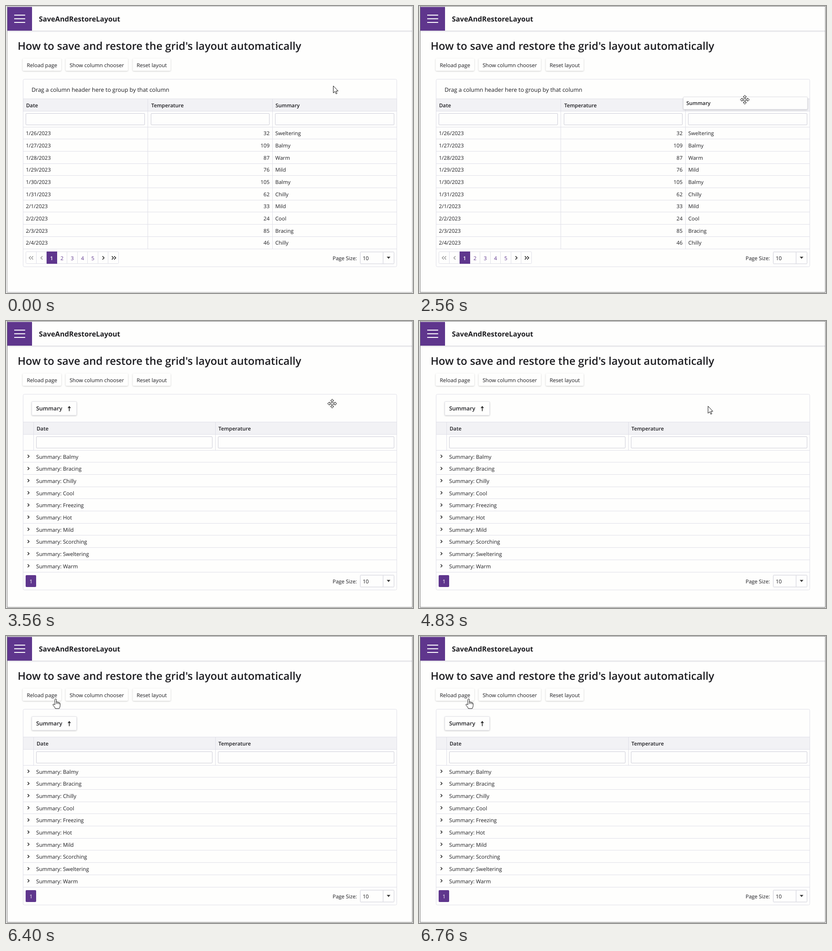
Recreate the animation shown at these times as an HTML page. Size 891 by 629 pixels, loop 9500 ms.

```html
<!DOCTYPE html>
<html lang="en">
<head>
<meta charset="utf-8">
<title>SaveAndRestoreLayout</title>
<style>
  html, body { margin: 0; width: 100%; height: 100%; overflow: hidden; background: #f0f0f0; }
  svg { display: block; }
  text { font-family: "Open Sans", "Noto Sans", sans-serif; white-space: pre; text-rendering: geometricPrecision; }
  .raised { fill: #fefefd; filter: drop-shadow(0 1px 1.5px #0003); }
  .box { fill: #fefefd; stroke: #cdcdd8; }
  .line { fill: none; stroke: #dfdfe8; }
  .ink { fill: none; stroke: #222; stroke-width: 1.6; }
  .cursor { fill: #fff; stroke: #111; stroke-linejoin: round; }
</style>
</head>
<body>
<svg id="stage" width="891" height="629" viewBox="0 0 891 629"></svg>
<script>
const PURPLE = '#5f368d';
const LOOP = 9500;

const text = (x, mid, str, { size = 11.5, weight = 400, fill = '#1c1c20', anchor = 'start' } = {}) =>
  `<text x="${x}" y="${mid + size * 0.365}" font-size="${size}" font-weight="${weight}" fill="${fill}" text-anchor="${anchor}">${str}</text>`;
const rect = (x, y, right, bottom, attrs) =>
  `<rect x="${x}" y="${y}" width="${right - x}" height="${bottom - y}" ${attrs}/>`;
const path = (d, attrs) => `<path d="${d}" ${attrs}/>`;
const box = (x, y, right, bottom) => rect(x, y, right, bottom, 'rx="1.5" class="box"');
const group = (id, body) => `<g id="${id}">${body}</g>`;
const rows = (items, draw) => items.map(draw).join('');
const rowLine = (top, i) => Math.floor(top + 0.3 + 26.67 * i) + 0.5;
const arrow = (x, y, dir) =>
  path(`M${x} ${y}v${dir * 10}m-2.7 ${dir * -3.2}l2.7 ${dir * 3.2} 2.7 ${dir * -3.2}`, 'class="ink"');
const chevron = (x, y, dir, color, h = 3.6) =>
  path(`M${x - dir * h / 2} ${y - h}l${dir * h} ${h} ${-dir * h} ${h}`, `class="ink" style="stroke:${color};stroke-width:1.5"`);

function frame() {
  const bars = rows([20, 28, 36], y => path(`M18 ${y}H42`, 'stroke="#fff" stroke-width="2"'));
  return rect(3, 1, 889, 627, 'fill="#fefefd"') +
    rect(3, 54, 889, 55, 'fill="#dcdce0"') + rect(3, 55, 889, 56, 'fill="#e9e9ec"') +
    rect(3, 56, 889, 57.5, 'fill="#f6f6f7"') +
    rect(3, 2, 57, 54, `fill="${PURPLE}"`) + bars +
    rect(2.5, 0.5, 889.5, 627.5, 'id="border" fill="none"') +
    text(72, 28.7, 'SaveAndRestoreLayout', { size: 15.4, weight: 700 }) +
    text(25.5, 87, "How to save and restore the grid's layout automatically", { size: 23.4, weight: 600 });
}

function buttons() {
  return rows([[36.5, 121, 'Reload page'], [130.5, 267, 'Show column chooser'], [277.5, 360.5, 'Reset layout']],
    ([x, right, label]) => rect(x, 115, right, 142, 'rx="2" class="raised"') +
      text((x + right) / 2, 129.5, label, { anchor: 'middle', size: 11.6 }));
}

// Shared grid parts: outline, header, filter row, row lines, page size
function gridShell(head, columns, dividers, dividerEnd) {
  const top = head + 61, end = rowLine(top, 10);
  const lines = Array.from({ length: 11 }, (_, i) => `M37 ${rowLine(top, i)}H856`).join('');
  return rect(37, head, 856, head + 26.5, 'fill="#f2f2f5"') +
    path(`M37 ${head - 0.5}H856M37 ${head + 26.5}H856${lines}` +
      dividers.map(x => `M${x} ${head}V${dividerEnd}`).join(''), 'class="line"') +
    rect(37.5, 160.5, 855.5, end + 39, 'rx="3" class="line"') +
    rows(columns, ([label, x, right]) =>
      text(x + 0.5, head + 13.7, label, { weight: 600, size: 11.4 }) +
      box(x, head + 31.5, right, head + 56.5)) +
    text(715, end + 20.3, 'Page Size:') +
    box(775.5, end + 6.5, 849.5, end + 32.5) +
    path(`M825.5 ${end + 7}v25`, 'stroke="#cdcdd8"') +
    text(781, end + 20.3, '10') +
    path(`M833.5 ${end + 17}h8l-4 4.6z`, 'fill="#333"');
}

function flatGrid() {
  const data = [32, 'Sweltering', 109, 'Balmy', 87, 'Warm', 76, 'Mild', 105, 'Balmy',
    62, 'Chilly', 33, 'Mild', 24, 'Cool', 85, 'Bracing', 46, 'Chilly'];
  const body = rows([...Array(10).keys()], i => {
    const y = 279.2 + 26.67 * i;
    const day = new Date(2023, 0, 26 + i);
    return text(43.5, y, `${day.getMonth() + 1}/${day.getDate()}/2023`) +
      text(577, y, data[2 * i], { anchor: 'end' }) + text(589.5, y, data[2 * i + 1]);
  });
  const cell = 22.56;
  const pages = rows([1, 2, 3, 4, 5], n =>
    text(43.5 + cell * (n + 1.5), 552.5, n, { anchor: 'middle', fill: n === 1 ? '#fff' : PURPLE, weight: n === 1 ? 600 : 400 }));
  const seams = [1, 2, 3, 4, 5, 6, 7, 8].map(i => `M${Math.floor(43.5 + cell * i) + 0.5} 539v26`).join('');
  return gridShell(204, [['Date', 43.5, 303.5], ['Temperature', 317.5, 576.5], ['Summary', 589.5, 849.5]], [310.5, 583.5], 532) +
    text(56, 183, 'Drag a column header here to group by that column', { size: 12.45 }) + body +
    rect(43.5, 538.5, 246.5, 564.5, 'rx="2" class="line"') + path(seams, 'class="line"') +
    rect(89, 538, 112, 565, `fill="${PURPLE}"`) + pages +
    chevron(52.5, 552, -1, '#999') + chevron(57.5, 552, -1, '#999') + chevron(78, 552, -1, '#999') +
    chevron(213, 552, 1, '#222') + chevron(233.5, 552, 1, '#222') + chevron(238.5, 552, 1, '#222');
}

function groupedGrid() {
  const names = ['Balmy', 'Bracing', 'Chilly', 'Cool', 'Freezing', 'Hot', 'Mild', 'Scorching', 'Sweltering', 'Warm'];
  return gridShell(222, [['Date', 66.5, 451.5], ['Temperature', 464.5, 849.5]], [60.5, 458.5], 283) +
    rect(56.5, 176.5, 154.5, 206.5, 'rx="2" class="raised" stroke="#e2e2e8"') +
    text(66, 192, 'Summary', { size: 12.3, weight: 600 }) + arrow(138.5, 197.5, -1) +
    rows(names, (name, i) => {
      const y = 297.3 + 26.67 * i;
      return chevron(49, y - 0.8, 1, '#222', 3.2) + text(66, y, 'Summary: ' + name, { size: 11.7 });
    }) +
    rect(43, 557, 66, 583, `rx="2" fill="${PURPLE}"`) +
    text(54.8, 570.5, '1', { fill: '#fff', anchor: 'middle' });
}

const shapes = {
  pointer: 'M0 0V15.5L3.6 12.2 6 17.6 8.3 16.6 6 11.3H10.6Z',
  move: 'M0-10L3.5-6H1.3V-1.3H6V-3.5L10 0 6 3.5V1.3H1.3V6H3.5L0 10-3.5 6H-1.3V1.3H-6V3.5L-10 0-6-3.5V-1.3H-1.3V-6H-3.5Z',
  hand: 'M-2 13V1.5A1.7 1.7 0 0 1 1.4 1.5V7Q3 5.6 4.4 7.4Q6 6.4 7.2 8.2Q9.3 7.8 9.5 9.8V14.5Q9.5 17.5 7.5 21H-1Q-2 18-6 13.6Q-6.8 11.4-5 11.2Q-3.6 11.2-2 13ZM1.4 7V11M4.4 7.4V11M7.2 8.2V11.5'
};

const stage = document.getElementById('stage');
stage.innerHTML = frame() + group('buttons', buttons()) + group('flat', flatGrid()) + group('grouped', groupedGrid()) +
  group('marks', arrow(37.5, 149, 1) + arrow(37.5, 215, -1)) +
  group('dragged', rect(-134.5, -6, 137, 21, 'rx="2" class="raised" stroke="#e2e2e8"') +
    text(-128, 8, 'Summary', { weight: 600, size: 11.4 })) +
  Object.entries(shapes).map(([id, d]) => path(d, `id="${id}" class="cursor"`)).join('');

const el = id => document.getElementById(id);
const show = (id, on) => { el(id).style.display = on ? '' : 'none'; };
const place = (id, x, y) => el(id).setAttribute('transform', `translate(${x} ${y})`);

// Mouse path: time, x, y
const route = [
  [0, 716.5, 175], [1759, 716.5, 175], [1760, 716.5, 180], [1950, 714, 203], [2130, 712, 215],
  [2400, 712, 215], [2650, 714, 200], [2900, 716, 188], [3130, 714, 181],
  [4660, 714, 181], [4900, 600, 189], [5200, 420, 185], [5500, 228.5, 175], [5600, 160, 159],
  [5750, 122, 146], [5930, 109, 138], [LOOP, 109, 138]
];

function mouseAt(t) {
  const i = route.findIndex(key => key[0] > t);
  const [t0, x0, y0] = route[i - 1], [t1, x1, y1] = route[i];
  const k = (t - t0) / (t1 - t0);
  return [x0 + (x1 - x0) * k, y0 + (y1 - y0) * k];
}

function draw(t) {
  const [x, y] = mouseAt(t);
  const dragging = t >= 2400 && t < 3560;
  const loading = t >= 6530 && t < 6700;
  const cursor = t >= 2400 && t <= 4660 ? 'move' : x < 121 && y < 143 ? 'hand' : 'pointer';
  show('buttons', !loading);
  show('flat', t < 3560);
  show('grouped', t >= 3560 && !loading);
  show('dragged', dragging);
  show('marks', dragging && y < 204);
  place('dragged', x, y);
  for (const id in shapes) {
    show(id, id === cursor);
    place(id, x, y);
  }
  el('border').setAttribute('stroke', t < 2400 ? '#aaa' : '#777');
}

const start = performance.now();
function tick() {
  draw((performance.now() - start) % LOOP);
  requestAnimationFrame(tick);
}
tick();
</script>
</body>
</html>
```
